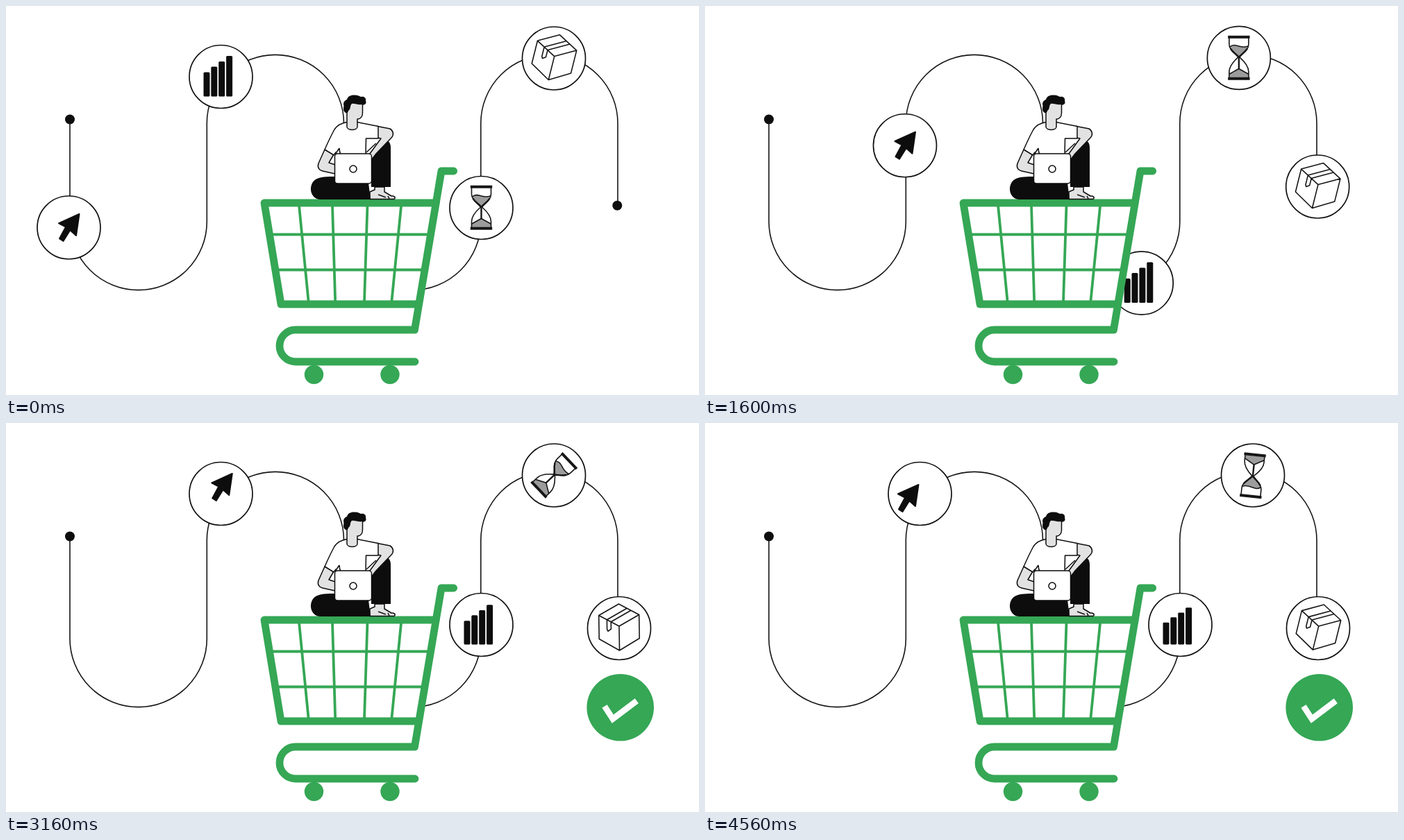
Recreate the animation shown at these times as an HTML page. Size 998 px wide and 561 px high, loop 4.6 s.

```html
<!DOCTYPE html>
<html lang="en">
<head>
<meta charset="utf-8">
<title>Order journey</title>
<style>
  html, body { margin: 0; width: 100%; height: 100%; overflow: hidden; background: #fff; }
  svg { display: block; width: 100vw; height: 100vh; }
  .line { fill: none; stroke: #161616; stroke-width: 1.6; }
  .ink { fill: #0d0d0d; }
  .white { fill: #fff; }
  .skin { fill: #e2e2e2; }
  .edge { stroke: #0d0d0d; stroke-width: 1.5; stroke-linejoin: round; stroke-linecap: round; }
  .ring { fill: #fff; stroke: #111; stroke-width: 1.7; }
  .cart { fill: none; stroke: #35a755; stroke-width: 10.8; stroke-linecap: round; stroke-linejoin: round; }
  .cart.mesh { stroke-width: 3.8; stroke-linecap: butt; }
  .green { fill: #35a755; }
  .sand { fill: #9c9c9c; }
</style>
</head>
<body>
<svg viewBox="0 0 998 561">
  <path id="route" class="line" d="M92 163V311A98.6 98.6 0 0 0 289.3 311V169A98.6 98.6 0 0 1 486.5 169V311A98.6 98.6 0 0 0 683.8 311V169A98.6 98.6 0 0 1 881 169V288"/>
  <circle class="ink" cx="92" cy="163.5" r="7"/>
  <circle class="ink" cx="880.3" cy="287.7" r="7"/>

  <g id="click">
    <circle class="ring" r="45.5"/>
    <path class="icon ink" stroke="#0d0d0d" stroke-width="2" stroke-linejoin="round" d="M15-19.5L-14.5-6.2L-4.5-.8L-13.5 16L-8 19.5L1.8 3.8L10.5 11.5Z"/>
  </g>
  <g id="sales">
    <circle class="ring" r="45.5"/>
    <g class="icon ink">
      <rect x="-25" y="-35" width="9" height="35" rx="1.6"/>
      <rect x="-14.2" y="-43" width="9" height="43" rx="1.6"/>
      <rect x="-3.3" y="-50.5" width="9" height="50.5" rx="1.6"/>
      <rect x="7.6" y="-58.5" width="9" height="58.5" rx="1.6"/>
    </g>
  </g>
  <g id="wait">
    <circle class="ring" r="45.5"/>
    <g class="icon">
      <path class="sand" d="M-13-16C-8-20-4-18 0-17S8-15 13-17C11-9 5-6 0-1C-5-6-11-9-13-16ZM-13.5 28V23L0 15.5L13.5 23V28Z"/>
      <path class="line" d="M-14-29V-20C-14-11-6-8-1-1C-9 6-14 12-14 20V28M14-29V-20C14-11 6-8 1-1C9 6 14 12 14 20V28M-13-16C-8-20-4-18 0-17S8-15 13-17M-13.5 23L0 15.5L13.5 23"/>
      <path class="line" style="stroke-width:2.4" d="M-12-13.5C-9-8-4-6 0-1C4-6 9-8 12-13.5M0-1V16"/>
      <path class="line" style="stroke-width:4" d="M-15.7-30.3H15.7M-15.7 29.7H15.7"/>
    </g>
  </g>
  <g id="parcel">
    <circle class="ring" r="45.5"/>
    <path class="icon line" stroke-linejoin="round" d="M0-35L29-19V15L0 32L-29 15V-19ZM-29-19L0-3L29-19M0-3V32M11.6-28.6L-17.4-12.6V1.5L-16 4L-11.6 1V-9.4L17.4-25.4"/>
  </g>
  <g id="done">
    <circle class="green" r="48.3"/>
    <path fill="none" stroke="#fff" stroke-width="8.6" d="M-22.7-1.8L-10.8 16.5L23.6-9.6"/>
  </g>

  <g id="trolley">
    <path class="white" d="M372 284H619L594 430H396Z"/>
    <path class="cart mesh" d="M380 329.5H611M388 380.5H603M422 287L435.7 427M470 287L474.2 427M520.5 287L516 427M569.2 287L555.3 427"/>
    <path class="cart" d="M619 284H372L396 430H594"/>
    <path class="cart" d="M644.7 238H627L588.5 467H417A23 23 0 0 0 417 513H589"/>
    <circle class="green" cx="443.5" cy="531.5" r="13.7"/>
    <circle class="green" cx="553" cy="531.5" r="13.7"/>
  </g>

  <g id="shopper">
    <path class="ink" d="M521 216L543 195C550 192 554 197 554 204V261H526V240Z"/>
    <path class="skin edge" d="M531 261V265L524 268V278.5H559C562 276 559 273.5 555 274L545 268V261Z"/>
    <path class="line" d="M536 272L547 276M550 274L552 278"/>
    <path class="ink" d="M476 246C462 246 453 246 446 250C434 258 438 279 453 279H525L522 255H476Z"/>
    <path class="skin edge" d="M535 173.5L553 177C558 180 559 186 555 190L533 213L527 221L524 213L540 191L535 190Z"/>
    <path class="skin edge" d="M459 207L450 227C448 233 451 237 456 238L474 242V229L465 226L472 214Z"/>
    <path class="white edge" d="M491 167.5C482 169 477 172 473 178C468 187 463 198 459 207L472 215L475 211V215H518L518.5 191H536V173.5L506 167.5Z"/>
    <path class="line" d="M480 205C480 209 481 212 482 215M474 214L480 205M519 211L533 198"/>
    <path class="skin edge" d="M491 150V174C491 180 506 180 506 174V163C511 163 513.5 159 513.5 154V138H495Z"/>
    <path class="ink" d="M489 154C485 152 486 147 486.5 144C485 139 488 136 491 135C492 130 497 128 502 128.5C506 128 509 130 511 131C516 130 519 133 518 137C520 141 516 144 512 142C507 143 502 140 498 141C495 143 497 149 493 151C493 153 491 155 489 154Z"/>
    <rect class="white edge" x="473.5" y="213" width="53" height="43" rx="4" stroke-width="1.8"/>
    <circle class="white edge" cx="500" cy="235" r="5"/>
  </g>
</svg>
<script>
const LOOP = 4600, DEPART = 500, SETTLE = 2200;
const $ = id => document.getElementById(id);
const route = $('route');

const mix = (a, b, p) => a + (b - a) * p;
const span = (t, from, length) => Math.min(1, Math.max(0, (t - from) / length));
const smooth = u => u * u * (3 - 2 * u);
const rad = deg => deg * Math.PI / 180;

// Steady travel; a positive bend is quick at both ends, a negative one eases in and out.
const travel = (u, bend) => u + bend * Math.sin(2 * Math.PI * u);
const backOut = u => 1 + 4 * (u - 1) ** 3 + 3 * (u - 1) ** 2;
const pulse = t => 1 + .1 * Math.sin(Math.PI * span(t, 1720, 440)) ** 2;
const settled = t => smooth(span(t, SETTLE, 480));

// The pointer circles slowly once it has arrived.
function drift(t) {
  const a = rad((t - 2500) * .098), k = settled(t);
  return `translate(${k * (13.5 * Math.cos(a) - 4.5)} ${k * (1.8 - 12.5 * Math.sin(a))})`;
}
function breathe(t) {
  const height = .98 + .07 * Math.cos(2 * Math.PI * (t - 3640) / 1920);
  return `translate(0 28.5) scale(1 ${mix(1, height, settled(t))})`;
}
const turn = t => `rotate(${186 * span(t, 2240, 2320) ** 1.5})`;
const sway = t => `rotate(${mix(14, 1.6 * ((t - 3100) / 480) ** 2 - 1, settled(t))})`;

// Resting places: distance along the route and the true centre there.
const stops = [
  [156, 90.5, 319.5], [669.5, 309.5, 102], [1381.5, 684.5, 291],
  [1665.3, 789, 75.5], [1932, 883, 296]
].map(([s, x, y]) => {
  const p = route.getPointAtLength(s);
  return { s, dx: x - p.x, dy: y - p.y };
});

const badges = [
  { id: 'click', time: 1300, bend: .058, pose: drift },
  { id: 'sales', time: 1300, bend: .036, pose: breathe },
  { id: 'wait', time: 1230, bend: -.055, pose: turn },
  { id: 'parcel', time: 1300, bend: -.04, pose: sway }
].map((badge, i) => ({
  ...badge, el: $(badge.id), icon: $(badge.id).querySelector('.icon'),
  from: stops[i], to: stops[i + 1]
}));

function draw(t) {
  for (const { el, icon, time, bend, pose, from, to } of badges) {
    const p = travel(span(t, DEPART, time), bend);
    const at = route.getPointAtLength(mix(from.s, to.s, p));
    const out = (1 - p) ** 4, into = p ** 4;
    const x = at.x + from.dx * out + to.dx * into;
    const y = at.y + from.dy * out + to.dy * into;
    el.setAttribute('transform', `translate(${x} ${y}) scale(${pulse(t)})`);
    icon.setAttribute('transform', pose(t));
  }
  $('done').setAttribute('transform', `translate(884.7 410.3) scale(${backOut(span(t, 2300, 500))})`);
}

function tick() {
  draw(performance.now() % LOOP);
  requestAnimationFrame(tick);
}
tick();
</script>
</body>
</html>
```
